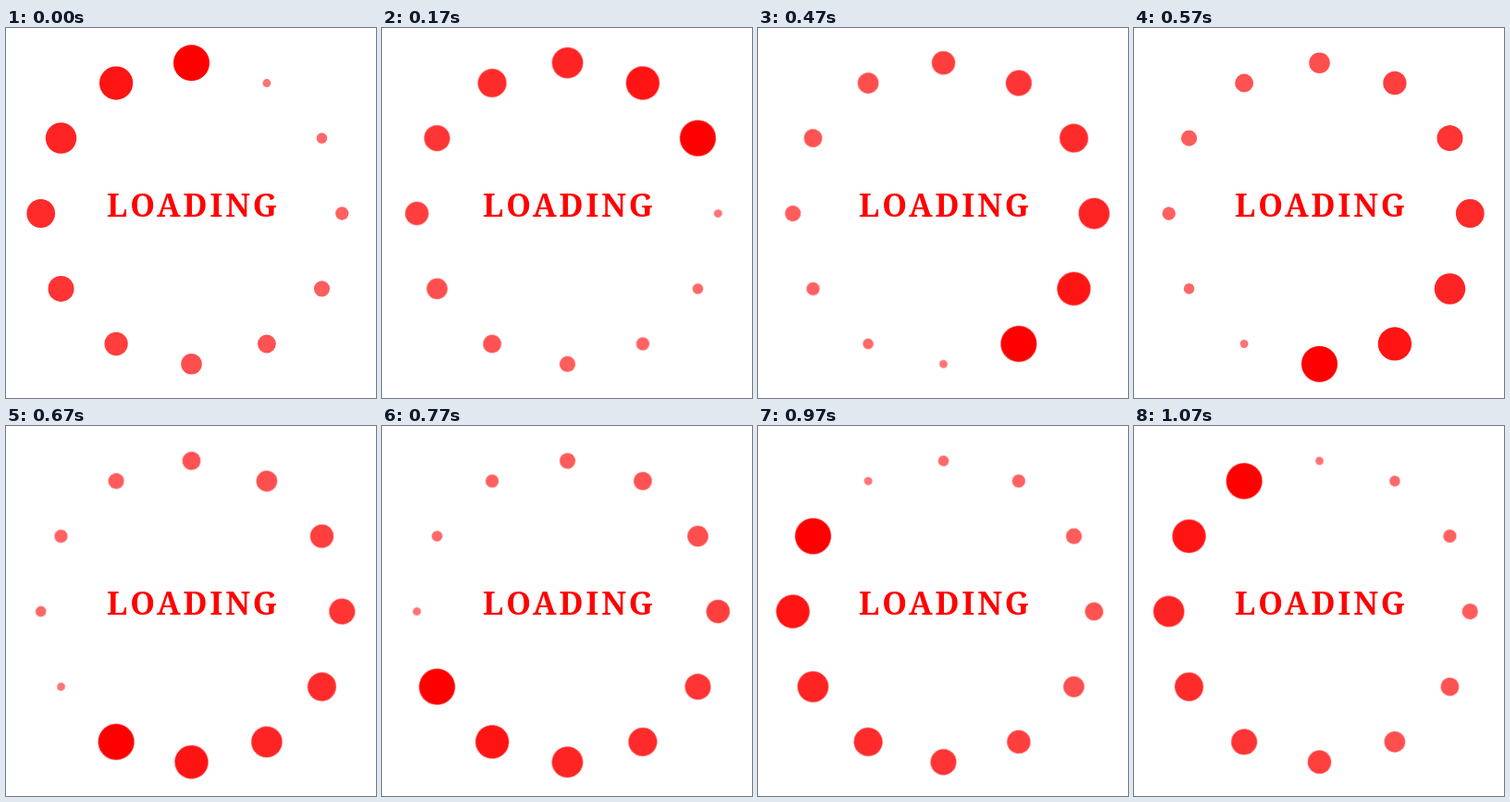
Recreate the animation shown at these times as an HTML page. Size 400x400 px, loop 1.17 s.

```html
<!DOCTYPE html>
<html lang="en">
<head>
<meta charset="utf-8">
<title>Loading</title>
<style>
  html, body {
    margin: 0;
    width: 100%;
    height: 100%;
    overflow: hidden;
    background: #fff;
  }
  svg {
    display: block;
    width: 100%;
    height: 100%;
  }
  text {
    font: 700 34px "Copperplate Gothic Bold", "Noto Serif", serif;
    letter-spacing: 2.9px;
    fill: #f00;
  }
  #ring {
    transform-origin: 200.5px 200.5px;
    animation: turn 1170ms infinite;
  }
  /* The first step lasts 70 ms, the other eleven 100 ms each. */
  @keyframes turn {
    0% { transform: rotate(0deg); animation-timing-function: steps(1, end); }
    5.98291% { transform: rotate(30deg); animation-timing-function: steps(11, end); }
    100% { transform: rotate(360deg); }
  }
</style>
</head>
<body>
<svg viewBox="0 0 400 400">
  <g id="ring"></g>
  <text x="109" y="204">LOADING</text>
</svg>
<script>
  const ring = document.getElementById("ring");
  const center = 200.5;
  const orbit = 162.8;
  const tints = [0, 20, 36, 43, 52, 62, 78, 82, 92, 97, 104, 116];

  // Dots trail counterclockwise behind the largest one.
  tints.forEach((tint, age) => {
    const angle = -age * Math.PI / 6;
    const dot = document.createElementNS("http://www.w3.org/2000/svg", "circle");
    dot.setAttribute("cx", center + orbit * Math.sin(angle));
    dot.setAttribute("cy", center - orbit * Math.cos(angle));
    dot.setAttribute("r", 19.5 - 1.37 * age);
    dot.setAttribute("fill", `rgb(255, ${tint}, ${tint})`);
    ring.append(dot);
  });
</script>
</body>
</html>
```
